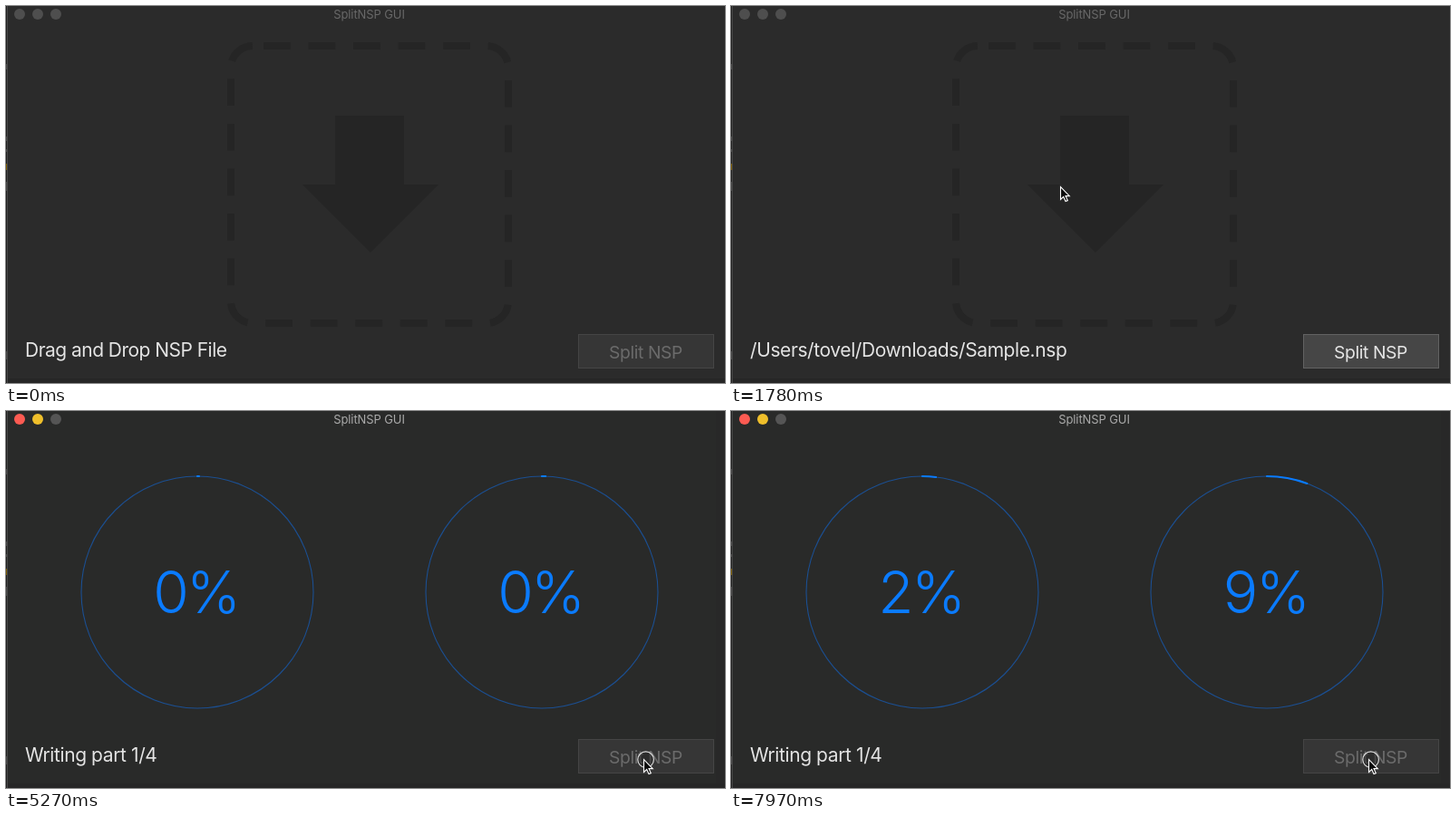
An HTML page for the animation above (8 s loop, 793 px wide and 416 px high).

```html
<!DOCTYPE html>
<html lang="en">
<head>
<meta charset="utf-8">
<title>SplitNSP GUI</title>
<style>
  html, body { margin: 0; width: 100%; height: 100%; overflow: hidden; background: #2b2b2b; }
  svg { display: block; width: 793px; height: 416px; font-family: Inter, "Open Sans", sans-serif; }

  .title { font-size: 13px; letter-spacing: -.1px; text-anchor: middle; }
  .label { font-size: 21px; letter-spacing: -.4px; fill: #e4e4e4; }
  .label.idle { letter-spacing: -.53px; }
  .button { font-size: 19.3px; letter-spacing: -.4px; text-anchor: middle; }
  .percent { font-size: 64px; font-weight: 300; text-anchor: middle; fill: #0a7bff; }
  .ring { fill: none; stroke: #1b4f92; stroke-width: 1.1; }
  .arc { fill: none; stroke: #0a7bff; stroke-width: 2; stroke-linecap: round; }

  /* Hard switches between states */
  .idle, .ready, .hover, .calm, .active, .work, .drag, .press { animation: 8s step-end infinite; }
  .idle { animation-name: idle; }
  .ready { animation-name: ready; }
  .hover { animation-name: hover; }
  .calm { animation-name: calm; }
  .active { animation-name: active; }
  .work { animation-name: work; }
  .drag { animation-name: drag; }
  .press { animation-name: press; }
  @keyframes idle { 0% { opacity: 1 } 22.25%, 100% { opacity: 0 } }
  @keyframes ready { 0% { opacity: 0 } 22.25% { opacity: 1 } 60.125%, 100% { opacity: 0 } }
  @keyframes hover { 0% { opacity: 0 } 12.6% { opacity: 1 } 22.25%, 100% { opacity: 0 } }
  @keyframes calm { 0% { opacity: 1 } 57.875%, 100% { opacity: 0 } }
  @keyframes active { 0% { opacity: 0 } 57.875%, 100% { opacity: 1 } }
  @keyframes work { 0% { opacity: 0 } 60.125%, 100% { opacity: 1 } }
  @keyframes drag { 0% { opacity: 1 } 22.25%, 100% { opacity: 0 } }
  @keyframes press { 0% { opacity: 1 } 22.25% { opacity: 0 } 57.875%, 100% { opacity: 1 } }

  .pointer { animation: move 8s infinite; }
  @keyframes move {
    0% { transform: translate(-25px, 291px); animation-timing-function: step-end }
    6.25% { transform: translate(-25px, 291px); animation-timing-function: steps(4, jump-both) }
    9.44% { transform: translate(150px, 240px); animation-timing-function: steps(4, jump-end) }
    12.625% { transform: translate(251px, 211px); animation-timing-function: step-end }
    17.75% { transform: translate(251px, 211px); animation-timing-function: steps(5, jump-end) }
    22.25% { transform: translate(363px, 199px); animation-timing-function: step-end }
    27.125% { transform: translate(363px, 199px); animation-timing-function: steps(2, jump-both) }
    29% { transform: translate(671px, 400px); animation-timing-function: step-end }
    31.25% { transform: translate(671px, 400px); animation-timing-function: steps(2, jump-both) }
    32.625% { transform: translate(712px, 404px); animation-timing-function: step-end }
    36.25% { transform: translate(712px, 404px); animation-timing-function: steps(2, jump-both) }
    37.75%, 100% { transform: translate(703px, 384px) }
  }

  .whole { animation: whole 8s linear infinite; }
  .part { animation: part 8s linear infinite; }
  @keyframes whole {
    0%, 60.1% { stroke-dasharray: 0px 360px }
    65.9% { stroke-dasharray: .9px 360px }
    80.1% { stroke-dasharray: 2.4px 360px }
    99.6%, 100% { stroke-dasharray: 6.8px 360px }
  }
  @keyframes part {
    0%, 60.1% { stroke-dasharray: 0px 360px }
    65.9% { stroke-dasharray: 1.9px 360px }
    77.1% { stroke-dasharray: 6.4px 360px }
    80.1% { stroke-dasharray: 7.3px 360px }
    87.6% { stroke-dasharray: 11.9px 360px }
    98.1% { stroke-dasharray: 19.3px 360px }
    99.6%, 100% { stroke-dasharray: 20.3px 360px }
  }
</style>
</head>
<body>
<svg viewBox="0 0 793 416">
  <defs>
    <radialGradient id="green" cy=".35">
      <stop stop-color="#3fbf35"/>
      <stop offset="1" stop-color="#1c8f1c"/>
    </radialGradient>
    <rect id="frame" x="248" y="44" width="306" height="306" rx="24" fill="none"
      stroke-dasharray="29.7 19.86" stroke-dashoffset="-12"/>
    <path id="arrow" d="M363 121H439V197H477L402 272L327 197H363Z"/>
  </defs>

  <rect width="793" height="416" fill="#2b2b2b"/>

  <g fill="#252525">
    <use href="#frame" stroke="#252525" stroke-width="8"/>
    <use href="#arrow"/>
  </g>
  <g class="hover" fill="#212121" stroke="#212121">
    <use href="#frame" stroke-width="10"/>
    <use href="#arrow" stroke-width="2"/>
  </g>

  <g class="work">
    <rect width="793" height="416" fill="#292a29"/>
    <rect x="783" width="10" height="416" fill="#282828"/>
    <circle class="ring" cx="211" cy="200" r="128"/>
    <circle class="ring" cx="591" cy="200" r="128"/>
    <circle class="arc whole" r="128" pathLength="360" transform="translate(211 200) rotate(-90)"/>
    <circle class="arc part" r="128" pathLength="360" transform="translate(591 200) rotate(-90)"/>
    <text class="percent" y="223"><tspan id="whole" x="182">0</tspan><tspan x="229">%</tspan></text>
    <text class="percent" y="223"><tspan id="part" x="562">0</tspan><tspan x="609">%</tspan></text>
    <text class="label" x="21" y="387">Writing part 1/4</text>
  </g>

  <!-- Window edges -->
  <rect y="411" width="793" height="5" fill="#262626"/>
  <rect width="1" height="416" fill="#1f1f1f"/>
  <rect x="1" width="1" height="416" fill="#484848"/>
  <path d="M0 64v6M0 144v5M0 158v3M0 194v10M0 381v9" stroke="#444" stroke-width="2"/>
  <rect y="174" width="1" height="7" fill="#7a5a00"/>

  <g class="calm">
    <g fill="#4e4e4e"><circle cx="15" cy="9" r="6"/><circle cx="35" cy="9" r="6"/><circle cx="55" cy="9" r="6"/></g>
    <text class="title" x="400.5" y="14" fill="#686868">SplitNSP GUI</text>
  </g>
  <g class="active">
    <circle cx="15" cy="9" r="6" fill="#fc5b52"/>
    <circle cx="35" cy="9" r="6" fill="#efbf2b"/>
    <circle cx="55" cy="9" r="6" fill="#555"/>
    <text class="title" x="400.5" y="14" fill="#aaa">SplitNSP GUI</text>
  </g>

  <text class="label idle" x="21" y="387">Drag and Drop NSP File</text>
  <text class="label ready" x="21" y="387">/Users/tovel/Downloads/Sample.nsp</text>

  <rect x="631.5" y="362.5" width="149" height="37" fill="#363636" stroke="#454545"/>
  <text class="button" x="705.5" y="388.5" fill="#6b6b6b">Split NSP</text>
  <g class="ready">
    <rect x="631.5" y="362.5" width="149" height="37" fill="#464646" stroke="#626262"/>
    <text class="button" x="705.5" y="388.5" fill="#e6e6e6">Split NSP</text>
  </g>

  <g class="pointer">
    <g class="drag">
      <path d="M-68-9h7l4 4v10h-11z" fill="#f2f2f2"/>
      <path d="M-61-9v4h4z" fill="#bdbdbd"/>
      <rect x="-54" y="-8.5" width="78" height="15" rx="7.5" fill="#0a58c6"/>
      <text x="-51" y="3.5" font-size="12" fill="#fff">Sample.nsp</text>
      <circle cx="9" cy="23" r="9.5" fill="url(#green)"/>
      <path d="M4 23h10M9 18v10" stroke="#fff" stroke-width="2.2"/>
    </g>
    <circle class="press" cx="2.6" cy=".7" r="8.8" fill="#222" fill-opacity=".5" stroke="#ddd" stroke-width="1.2"/>
    <path d="M.5.5V14.5L3.7 11.5L6 16.6L8.3 15.6L6 10.6H10.3Z" fill="#0a0a0a" stroke="#fff" stroke-width="1.1"/>
  </g>
</svg>
<script>
  const LOOP = 8000;
  // Times at which the part counter gains one percent
  const ticks = [5450, 5690, 5930, 6170, 6510, 6860, 7210, 7560, 7910];
  const whole = document.getElementById('whole');
  const part = document.getElementById('part');
  let start;

  function show(el, value) {
    const text = String(value);
    if (el.textContent !== text) el.textContent = text;
  }

  function draw(now) {
    start ??= now;
    const t = (now - start) % LOOP;
    const done = ticks.filter(tick => t >= tick).length;
    show(part, done);
    show(whole, Math.floor(done / 4)); // four parts in all
    requestAnimationFrame(draw);
  }
  requestAnimationFrame(draw);
</script>
</body>
</html>
```
